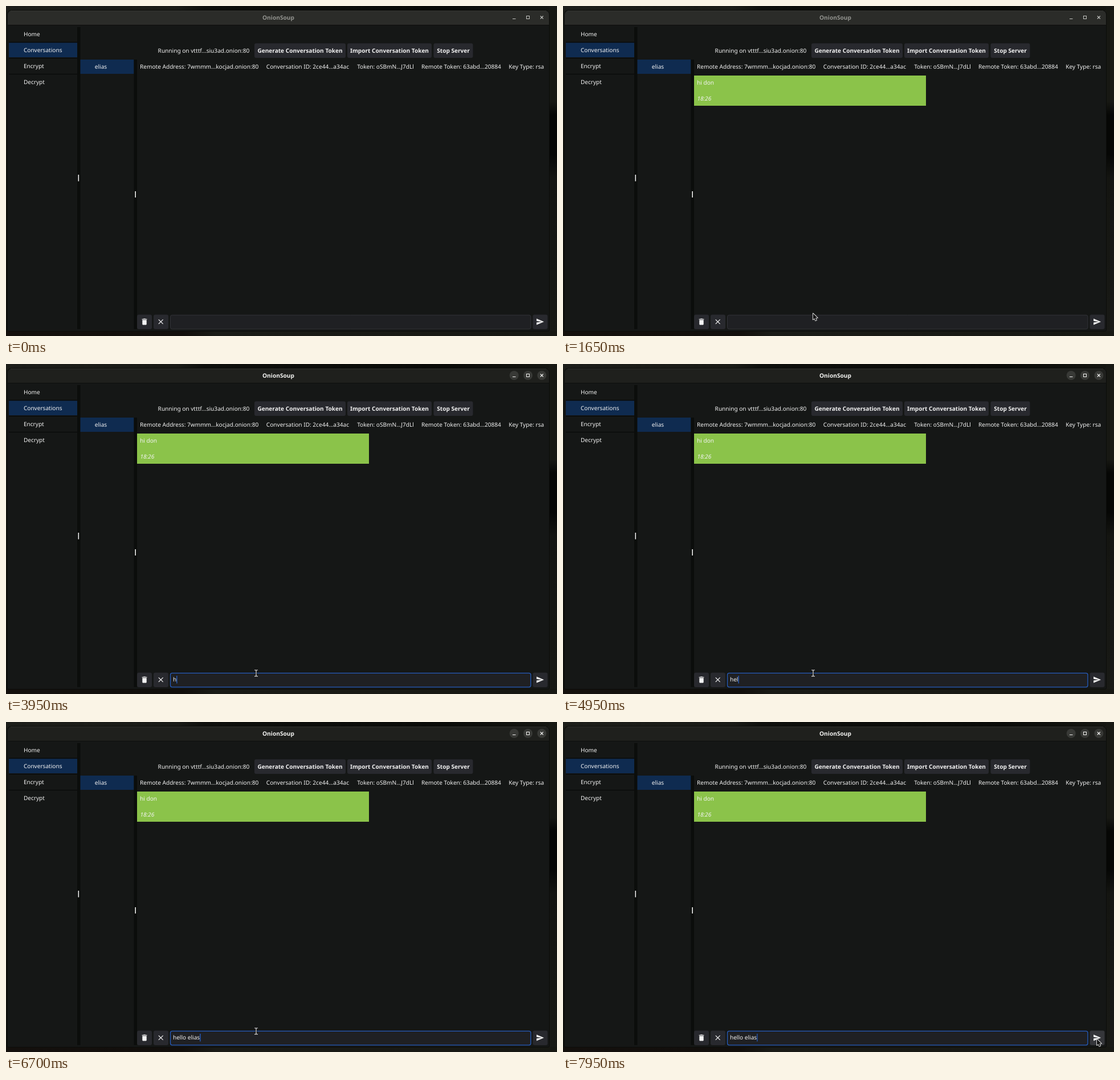
Recreate the animation shown at these times as an HTML page with a canvas. Size 967 by 579 pixels, loop 8000 ms.

```html
<!DOCTYPE html>
<html lang="en">
<head>
<meta charset="utf-8">
<title>OnionSoup</title>
<style>
  html, body { margin: 0; width: 100%; height: 100%; overflow: hidden; background: #0f100d; }
  canvas { display: block; }
</style>
</head>
<body>
<canvas id="stage" width="967" height="579"></canvas>
<script>
const ctx = document.getElementById('stage').getContext('2d');
ctx.textRendering = 'geometricPrecision';

const LOOP = 8000;
const FOCUS_AT = 2050;
const BUBBLE_AT = 50;
const MESSAGE = 'hello elias';
const KEY_TIMES = [3700, 4300, 4700, 5020, 5280, 5520, 5760, 5960, 6160, 6360, 6550];

const FONT = '10.1px "Noto Sans", sans-serif';
const BOLD = 'bold ' + FONT;
const WHITE = '#f3f3f3';
const BACK = '#151716';
const BUTTON = '#28292e';
const SELECTED = '#0f2b50';

const ICONS = {
  trash: new Path2D('M6 19c0 1.1.9 2 2 2h8c1.1 0 2-.9 2-2V7H6v12zM19 4h-3.5l-1-1h-5l-1 1H5v2h14V4z'),
  cross: new Path2D('M19 6.41L17.59 5 12 10.59 6.41 5 5 6.41 10.59 12 5 17.59 6.41 19 12 13.41 17.59 19 19 17.59 13.41 12z'),
  send: new Path2D('M2 21L23 12 2 3v7l15 2-15 2z')
};
const ARROW = new Path2D('M0 0V10.6L2.5 8.4 4.2 12.4 6.1 11.6 4.4 7.7H7.9Z');
const IBEAM = new Path2D('M-3-5.3H-1Q0-5.3 0-4.3Q0-5.3 1-5.3H3M0-4.3V4.5M-3 5.5H-1Q0 5.5 0 4.5Q0 5.5 1 5.5H3');

const clamp = v => Math.min(1, Math.max(0, v));
const mix = (a, b, p) => a + (b - a) * p;
const smooth = p => p * p * (3 - 2 * p);

function rect(x, y, w, h, color) {
  ctx.fillStyle = color;
  ctx.fillRect(x, y, w, h);
}

function rounded(x, y, w, h, radius, fill, stroke, line = 1) {
  ctx.beginPath();
  ctx.roundRect(x, y, w, h, radius);
  if (fill) { ctx.fillStyle = fill; ctx.fill(); }
  if (stroke) { ctx.strokeStyle = stroke; ctx.lineWidth = line; ctx.stroke(); }
}

// y is the middle of the capital letters
function text(str, x, y, font = FONT, color = WHITE, align = 'left') {
  ctx.font = font;
  ctx.textAlign = align;
  ctx.fillStyle = color;
  ctx.fillText(str, x, y + 3.7);
}

function gradient(x0, y0, x1, y1, stops) {
  const g = ctx.createLinearGradient(x0, y0, x1, y1);
  stops.forEach(([at, color]) => g.addColorStop(at, color));
  return g;
}

function icon(name, x, y, scale = 0.62) {
  ctx.save();
  ctx.translate(x - 12 * scale, y - 12 * scale);
  ctx.scale(scale, scale);
  ctx.fillStyle = WHITE;
  ctx.fill(ICONS[name]);
  ctx.restore();
}

function drawDesktop() {
  rect(0, 0, 967, 579, gradient(0, 0, 0, 579, [[0, '#1b1c18'], [0.5, '#151612'], [1, '#10110e']]));
  rect(0, 0, 967, 8, gradient(0, 0, 967, 0,
    [[0, '#1d1e1a'], [0.31, '#1a1b17'], [0.36, '#0e0f0c'], [0.8, '#0a0b08'], [1, '#161712']]));
  rect(953, 0, 14, 579, gradient(0, 0, 0, 579,
    [[0, '#171813'], [0.29, '#171813'], [0.33, '#060705'], [0.45, '#060705'], [0.52, '#141511'], [1, '#191a16']]));
  rect(0, 570, 967, 9, gradient(0, 0, 967, 0,
    [[0, '#14100d'], [0.32, '#120f0c'], [0.38, '#1a1b17'], [1, '#171813']]));
}

function drawTitleBar(focused) {
  rounded(2.5, 7.5, 951, 563, [7, 7, 2, 2], BACK, '#0b0c0a');
  rounded(3, 8, 950, 25, [7, 7, 0, 0], focused ? '#1f201d' : '#2b2c29');
  rect(8, 8, 940, 1, focused ? '#30312d' : '#363733');
  rect(3, 33, 950, 1, '#0d0e0c');
  const ink = focused ? '#f4f4f2' : '#92938f';
  text('OnionSoup', 478, 19.8, 'bold 10.2px "Noto Sans", sans-serif', ink, 'center');

  const glyph = focused ? '#f4f4f2' : '#c3c4c0';
  if (focused) {
    for (const x of [891.7, 916, 940.3]) rounded(x - 8, 12, 16, 16, 8, '#383936');
  }
  rect(889, 22, 5.5, 1, glyph);
  ctx.strokeStyle = glyph;
  ctx.lineWidth = 1;
  ctx.strokeRect(913.5, 17.5, 5, 5);
  ctx.lineWidth = 1.1;
  ctx.beginPath();
  ctx.moveTo(937.8, 17.5); ctx.lineTo(942.8, 22.5);
  ctx.moveTo(942.8, 17.5); ctx.lineTo(937.8, 22.5);
  ctx.stroke();
}

function drawPanels() {
  rect(5, 64.5, 120, 25.5, SELECTED);
  ['Home', 'Conversations', 'Encrypt', 'Decrypt'].forEach((label, i) => {
    text(label, 30.9, 49.2 + 28 * i);
    if (i) rect(5, 35 + 28 * i, 120, 1, '#050605');
  });

  rect(125, 37, 5.5, 530, '#0b0d0b');
  rect(126.5, 296, 1.6, 11.5, WHITE);
  rect(130.5, 94, 94, 25, SELECTED);
  text('elias', 155.8, 106.6);
  rect(224.5, 94, 5.5, 473, '#0b0d0b');
  rect(226.4, 325, 1.6, 11, WHITE);
}

function drawHeader() {
  text('Running on vtttf...siu3ad.onion:80', 266.6, 78);
  const buttons = [
    ['Generate Conversation Token', 436, 160],
    ['Import Conversation Token', 599, 148],
    ['Stop Server', 750.5, 69]
  ];
  for (const [label, x, w] of buttons) {
    rounded(x, 65.5, w, 25.5, 3, BUTTON);
    text(label, x + w / 2, 78, BOLD, WHITE, 'center');
  }
  const facts = [
    ['Remote Address: 7wmmm...kocjad.onion:80', 235],
    ['Conversation ID: 2ce44...a34ac', 456.8],
    ['Token: oSBmN...J7dLl', 616.2],
    ['Remote Token: 63abd...20884', 729],
    ['Key Type: rsa', 882.2]
  ];
  for (const [label, x] of facts) text(label, x, 106.7);
}

function drawBubble() {
  rect(230, 122, 407, 53, '#8bc34a');
  text('hi don', 235, 134.6);
  text('18:26', 235.4, 162.4, 'italic ' + FONT);
}

function drawEntry(t, focused) {
  rounded(288.5, 542.3, 632.5, 24.5, 3, '#1f2023', focused ? '#265cbd' : '#323338', focused ? 1.3 : 1);
  if (!focused) return;
  const count = KEY_TIMES.filter(k => k <= t).length;
  const typed = MESSAGE.slice(0, count);
  text(typed, 292.9, 553.6);

  // the caret fades in and out, and stays lit shortly after each key
  const since = Math.max(0, t - (count ? KEY_TIMES[count - 1] + 300 : FOCUS_AT));
  ctx.globalAlpha = 0.55 + 0.45 * Math.cos(since / 1000 * 2 * Math.PI);
  rect(293 + ctx.measureText(typed).width, 547, 1.2, 13.5, '#2b68d8');
  ctx.globalAlpha = 1;
}

function drawFooter(t, focused, hover) {
  rounded(230, 541.5, 26, 25.5, 3, BUTTON);
  icon('trash', 243, 554);
  rounded(259, 541.5, 26, 25.5, 3, BUTTON);
  icon('cross', 271.7, 554);
  rounded(924.5, 541.5, 26, 25.5, 3, hover ? '#35363a' : BUTTON);
  icon('send', 937.3, 554);
  drawEntry(t, focused);
}

function pointerAt(t) {
  if (t < 800) return null;
  if (t < 1900) {
    const p = clamp((t - 800) / 780);
    const down = smooth(mix(0.12, 1, p));
    const from = smooth(0.12);
    const y = mix(20, 539.5, (down - from) / (1 - from));
    return { x: 438.8 + 105 * Math.pow(1 - p, 4), y };
  }
  const settle = clamp((t - 1900) / 100);
  const p = smooth(clamp((t - 7100) / 600));
  return { x: mix(439, 937, p), y: mix(mix(539.5, 542.3, settle), 556.5, p) };
}

function drawPointer({ x, y }) {
  const beam = x > 288 && x < 921 && y > 542;
  ctx.save();
  ctx.translate(x, y);
  ctx.lineJoin = 'round';
  if (beam) {
    ctx.strokeStyle = '#0b0b0b';
    ctx.lineWidth = 2.8;
    ctx.stroke(IBEAM);
    ctx.strokeStyle = '#e8e8e8';
    ctx.lineWidth = 1.2;
    ctx.stroke(IBEAM);
  } else {
    ctx.strokeStyle = '#e8e8e8';
    ctx.lineWidth = 1.8;
    ctx.stroke(ARROW);
    ctx.fillStyle = '#151515';
    ctx.fill(ARROW);
  }
  ctx.restore();
}

function draw(t) {
  const focused = t >= FOCUS_AT;
  const pointer = pointerAt(t);
  drawDesktop();
  drawTitleBar(focused);
  drawPanels();
  drawHeader();
  if (t >= BUBBLE_AT) drawBubble();
  drawFooter(t, focused, pointer && pointer.x > 924.5);
  if (pointer) drawPointer(pointer);
}

const start = performance.now();
function tick() {
  draw((performance.now() - start) % LOOP);
  requestAnimationFrame(tick);
}
tick();
</script>
</body>
</html>
```
